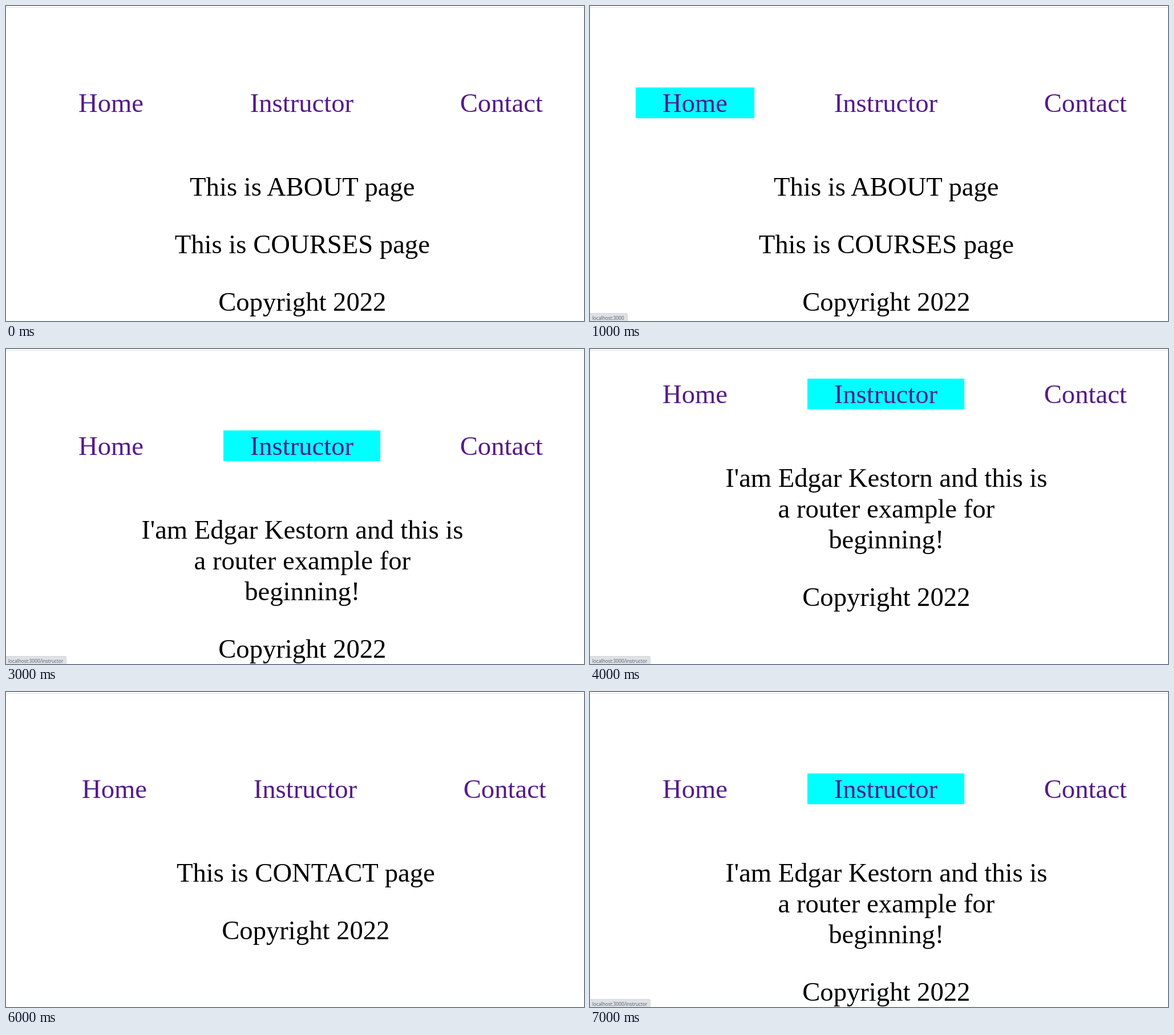
Animation, 1013 px wide and 553 px high, one loop 8000 ms. Source, as an HTML page:

```html
<!DOCTYPE html>
<html lang="en">
<head>
<meta charset="utf-8">
<title>Router example</title>
<style>
html, body {
  margin: 0;
  width: 100%;
  height: 100%;
  overflow: hidden;
  background: #fff;
}
.view {
  position: relative;
  width: 1013px;
  height: 553px;
  overflow: hidden;
  border: 0;
  font: 46.67px/54px "Liberation Serif", "Times New Roman", serif;
  color: #000;
}
.rule {
  position: absolute;
  top: 2px;
  width: 100%;
  height: 1px;
  background: #e0e0e0;
}

/* every change is a hard cut on an 8 s timeline: 1 s = 12.5% */
.page, nav span, main, .status {
  animation: 8s step-end infinite;
}
.page {
  position: absolute;
  inset: 0;
  animation-name: scroll;
}
nav {
  position: absolute;
  left: 80.33px;
  top: 143px;
  display: flex;
  gap: 2em;
  color: #551a8b;
}
nav span { padding: 0 1em; white-space: nowrap; }
.home { animation-name: hover-home; }
.teacher { animation-name: hover-teacher; }
.contact { animation-name: hover-contact; }

main {
  position: absolute;
  left: 19.33px;
  top: 290.33px;
  width: 1000px;
  text-align: center;
  white-space: nowrap;
  visibility: hidden;
}
p { margin: 0 0 1em; }
.home-text { animation-name: show-home; }
.teacher-text { animation-name: show-teacher; }
.contact-text { animation-name: show-contact; }

.status {
  position: absolute;
  left: 0;
  bottom: 0;
  height: 13px;
  padding: 0 5px 0 4px;
  border-top: 1px solid #d3d6da;
  border-right: 1px solid #d3d6da;
  border-radius: 0 3px 0 0;
  background: #dee1e6;
  color: #55595e;
  font: 8.25px/15px "Open Sans", "Noto Sans", sans-serif;
  white-space: nowrap;
  visibility: hidden;
}
.at-home { animation-name: hover-status-home; }
.at-teacher { animation-name: hover-status-teacher; }

@keyframes scroll {
  0% { transform: none; }
  50% { transform: translateY(-91px); }
  75% { transform: translateX(6px); }
  87.5%, 100% { transform: none; }
}
@keyframes hover-home {
  12.5% { background: #0ff; }
  25% { background: none; }
}
@keyframes hover-teacher {
  25% { background: #0ff; }
  62.5% { background: none; }
  87.5%, 100% { background: #0ff; }
}
@keyframes hover-contact {
  62.5% { background: #0ff; }
  75% { background: none; }
}
@keyframes show-home {
  0% { visibility: visible; }
  37.5%, 100% { visibility: hidden; }
}
@keyframes show-teacher {
  0% { visibility: hidden; }
  37.5% { visibility: visible; }
  75% { visibility: hidden; }
  87.5%, 100% { visibility: visible; }
}
@keyframes show-contact {
  0% { visibility: hidden; }
  75% { visibility: visible; }
  87.5%, 100% { visibility: hidden; }
}
@keyframes hover-status-home {
  0% { visibility: hidden; }
  12.5% { visibility: visible; }
  25%, 100% { visibility: hidden; }
}
@keyframes hover-status-teacher {
  0% { visibility: hidden; }
  25% { visibility: visible; }
  62.5% { visibility: hidden; }
  87.5%, 100% { visibility: visible; }
}
</style>
</head>
<body>
<div class="view">
  <div class="page">
    <nav>
      <span class="home">Home</span>
      <span class="teacher">Instructor</span>
      <span class="contact">Contact</span>
    </nav>
    <main class="home-text">
      <p>This is ABOUT page</p>
      <p>This is COURSES page</p>
      <p>Copyright 2022</p>
    </main>
    <main class="teacher-text">
      <p>I'am Edgar Kestorn and this is<br>a router example for<br>beginning!</p>
      <p>Copyright 2022</p>
    </main>
    <main class="contact-text">
      <p>This is CONTACT page</p>
      <p>Copyright 2022</p>
    </main>
  </div>
  <div class="rule"></div>
  <div class="status at-home">localhost:3000</div>
  <div class="status at-teacher">localhost:3000/instructor</div>
</div>
</body>
</html>
```
